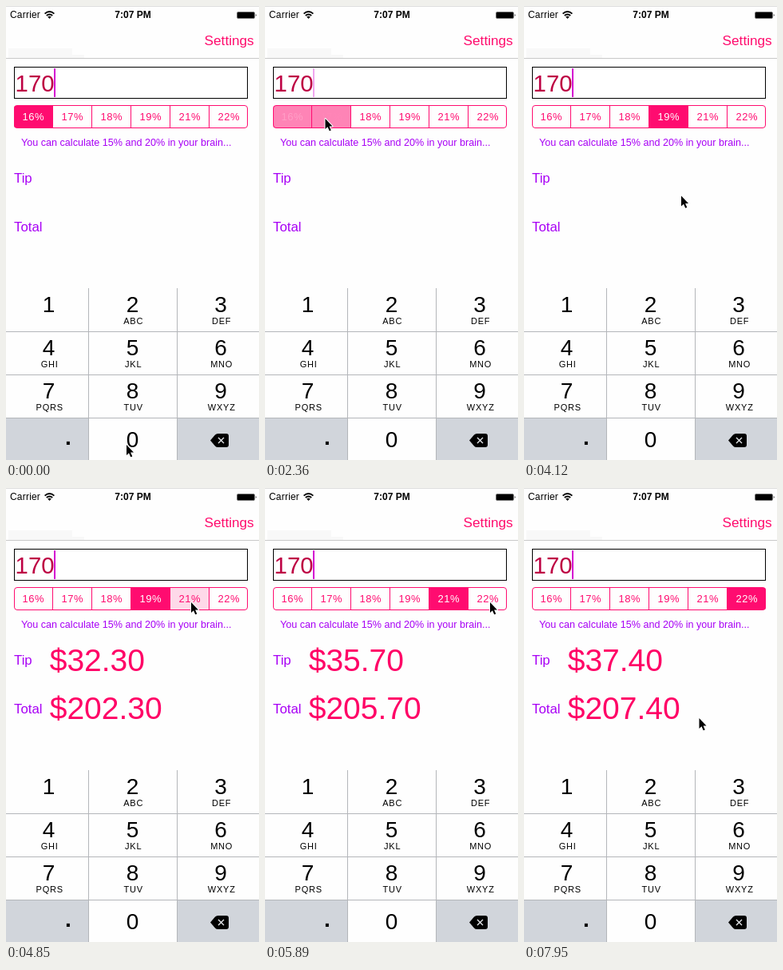
Animation of 317x568 px, one loop 8000 ms. Source, as an HTML page:

```html
<!DOCTYPE html>
<html lang="en">
<head>
<meta charset="utf-8">
<title>Tip calculator</title>
<style>
  html, body { margin: 0; width: 100%; height: 100%; overflow: hidden; background: #fefefe; }
  svg { display: block; width: 317px; height: 568px; font-family: "Liberation Sans", Arial, sans-serif; }
  .mid { text-anchor: middle; }
  .pink { fill: #ff0a6c; }
  .purple { fill: #a800f5; }
  .label { font-size: 16.8px; }
  .amount { font-size: 39px; fill: #ff0066; }
  .seg { font-size: 13px; letter-spacing: .5px; text-anchor: middle; }
  .digit { font-size: 28px; text-anchor: middle; }
  .letters { font-size: 11px; letter-spacing: .8px; text-anchor: middle; }
</style>
</head>
<body>
<svg id="stage" viewBox="0 0 317 568"></svg>
<script>
const STEP = 147.2, LOOP = 8000, BILL = 170;
const PINK = [255, 12, 112];
const rates = [16, 17, 18, 19, 21, 22];

// Per rate: step of the tap, and how many steps the press shows before it
const taps = [[1, 0], [16, 1], [22, 1], [27, 1], [34, 1], [41, 0]];

// Pointer path: step, x, y
const path = [
  [0, 150, 548], [2, 150, 548], [4, 222, 430], [5, 230, 375], [6, 212, 312], [7, 202, 294],
  [9, 200, 281], [11, 165, 235], [14, 82, 155], [15, 74.5, 140], [17, 74.5, 140],
  [20, 124, 146], [21, 127.5, 144], [23, 127.5, 144], [25, 177, 143], [27, 177, 143],
  [29, 215, 330], [30, 224, 317], [31, 224, 317], [33, 231, 142], [36, 231, 142],
  [39, 281, 142], [48, 281, 142], [54, 218.5, 287]
];

const text = (x, y, s, attrs = '') => `<text x="${x}" y="${y}" ${attrs}>${s}</text>`;
const rect = (x, y, w, h, attrs = '') => `<rect x="${x}" y="${y}" width="${w}" height="${h}" ${attrs}/>`;
const segX = i => 9.5 + 49 * i;

function statusBar() {
  return rect(0, 0, 317, 1, 'fill="#dedede"') +
    text(5, 15, 'Carrier', 'font-size="12" letter-spacing=".2"') +
    `<g fill="none" stroke="#000" stroke-width="1.9">
      <path d="M48.6 9.6Q54.5 4.6 60.4 9.6M50.8 12Q54.5 8.8 58.2 12"/>
    </g><path d="M52.2 13.6Q54.5 11.8 56.8 13.6L54.5 16Z"/>` +
    text(159, 15, '7:07 PM', 'class="mid" font-size="12" font-weight="bold"') +
    rect(289.5, 7.5, 22, 8, 'rx="1.5" stroke="#777"') +
    '<path d="M312.8 9.8Q314.6 11.5 312.8 13.2Z"/>' +
    '<path d="M3 53H83V61H98V65H3Z" fill="#f8f8f8"/>' +
    text(310.7, 49, 'Settings', 'class="pink" font-size="17.2" text-anchor="end"') +
    rect(0, 65, 317, 1, 'fill="#c9c9c9"');
}

function form() {
  const segs = rates.map((r, i) =>
    rect(segX(i), 124.5, 49, 28, 'class="fill"') +
    text(segX(i) + 24.7, 143, r + '%', 'class="seg"')).join('');
  const dividers = [1, 2, 3, 4, 5].map(i => `M${segX(i)} 124.5v28`).join('');
  return rect(10.5, 76.5, 292, 39, 'fill="#fff" stroke="#000"') +
    text(11.6, 106.5, BILL, 'font-size="29.3" fill="#bd0043"') +
    rect(60, 78, 2, 36, 'id="caret" fill="#d400d0"') +
    '<clipPath id="round">' + rect(10, 124, 293, 29, 'rx="4"') + '</clipPath>' +
    `<g clip-path="url(#round)">${segs}</g>` +
    `<g fill="none" stroke="rgb(${PINK})">${rect(10.5, 124.5, 292, 28, 'rx="3.5"')}<path d="${dividers}"/></g>` +
    text(19, 175, 'You can calculate 15% and 20% in your brain...',
      'class="purple" font-size="12.6"') +
    text(10, 221, 'Tip', 'class="purple label"') +
    text(10, 282, 'Total', 'class="purple label"') +
    text(54.7, 229.3, '', 'class="amount" id="tip"') +
    text(54.7, 289.3, '', 'class="amount" id="total"');
}

function keypad() {
  const cols = [53.5, 158.5, 269];
  const letters = ['', 'ABC', 'DEF', 'GHI', 'JKL', 'MNO', 'PQRS', 'TUV', 'WXYZ'];
  const keys = letters.map((s, i) => {
    const x = cols[i % 3], y = 382.5 + 54 * Math.floor(i / 3);
    return text(x, y, i + 1, 'class="digit"') + text(x + 1.2, y + 15.5, s, 'class="letters"');
  }).join('');
  return rect(0, 515, 103, 53, 'fill="#d1d5db"') + rect(215, 515, 102, 53, 'fill="#d1d5db"') +
    '<path d="M0 407.5H317M0 461.5H317M0 515.5H317M103.5 353V568M214.5 353V568" stroke="#b4b6ba"/>' +
    keys + text(158.5, 552, 0, 'class="digit"') +
    text(78, 548.5, '.', 'class="digit" font-weight="bold"') +
    '<path d="M256 543.5L262 536.6Q263.4 535 265.5 535H276Q279 535 279 538V549Q279 552 276 552H265.5Q263.4 552 262 550.4Z"/>' +
    '<path d="M266 540l7 7m0-7l-7 7" stroke="#e4e6ea" stroke-width="1.4"/>';
}

const pointer = `<path id="pointer" d="M1 1V14L4 11.2L6.2 16.3L8.3 15.4L6.1 10.4H10Z"
  stroke="#fff" stroke-width="2" paint-order="stroke" stroke-linejoin="round"/>`;

const $ = id => document.getElementById(id);
$('stage').innerHTML = statusBar() + form() + keypad() + pointer;
const fills = document.querySelectorAll('.fill');
const labels = document.querySelectorAll('.seg');

function pointerAt(n) {
  const k = path.findIndex(p => p[0] >= n);
  if (k < 1) return path[k < 0 ? path.length - 1 : 0].slice(1);
  const a = path[k - 1], b = path[k], u = (n - a[0]) / (b[0] - a[0]);
  return [1, 2].map(j => a[j] + (b[j] - a[j]) * u);
}

const money = v => '$' + v.toFixed(2);
const tint = white => `rgb(${PINK.map(c => Math.round(c + (255 - c) * white))})`;

function draw(ms) {
  const n = Math.floor((ms + 8) / STEP);
  const current = Math.max(0, taps.findLastIndex(([at]) => n >= at));
  const since = n - taps[current][0];
  const fading = current > 0 && since === 0;

  rates.forEach((_, i) => {
    const [at, press] = taps[i];
    let fill = 0, white = 0;
    if (i === current) fill = white = fading ? .5 : 1;
    else if (fading && i === current - 1) { fill = .5; white = .6; }
    else if (n < at && n >= at - press) fill = .15;
    fills[i].setAttribute('fill', `rgba(${PINK},${fill})`);
    labels[i].setAttribute('fill', tint(white));
  });

  const tip = BILL * rates[current] / 100;
  const shown = Math.min(1, Math.max(0, (since - 1) / 2));
  $('tip').textContent = money(tip);
  $('total').textContent = money(BILL + tip);
  $('tip').style.opacity = $('total').style.opacity = shown;

  // Caret: five steps on, two dimmed
  $('caret').style.opacity = (n + 3) % 7 < 5 ? 1 : .35;
  $('pointer').setAttribute('transform', `translate(${pointerAt(n)})`);
}

const start = performance.now();
function tick() {
  draw((performance.now() - start) % LOOP);
  requestAnimationFrame(tick);
}
tick();
</script>
</body>
</html>
```
